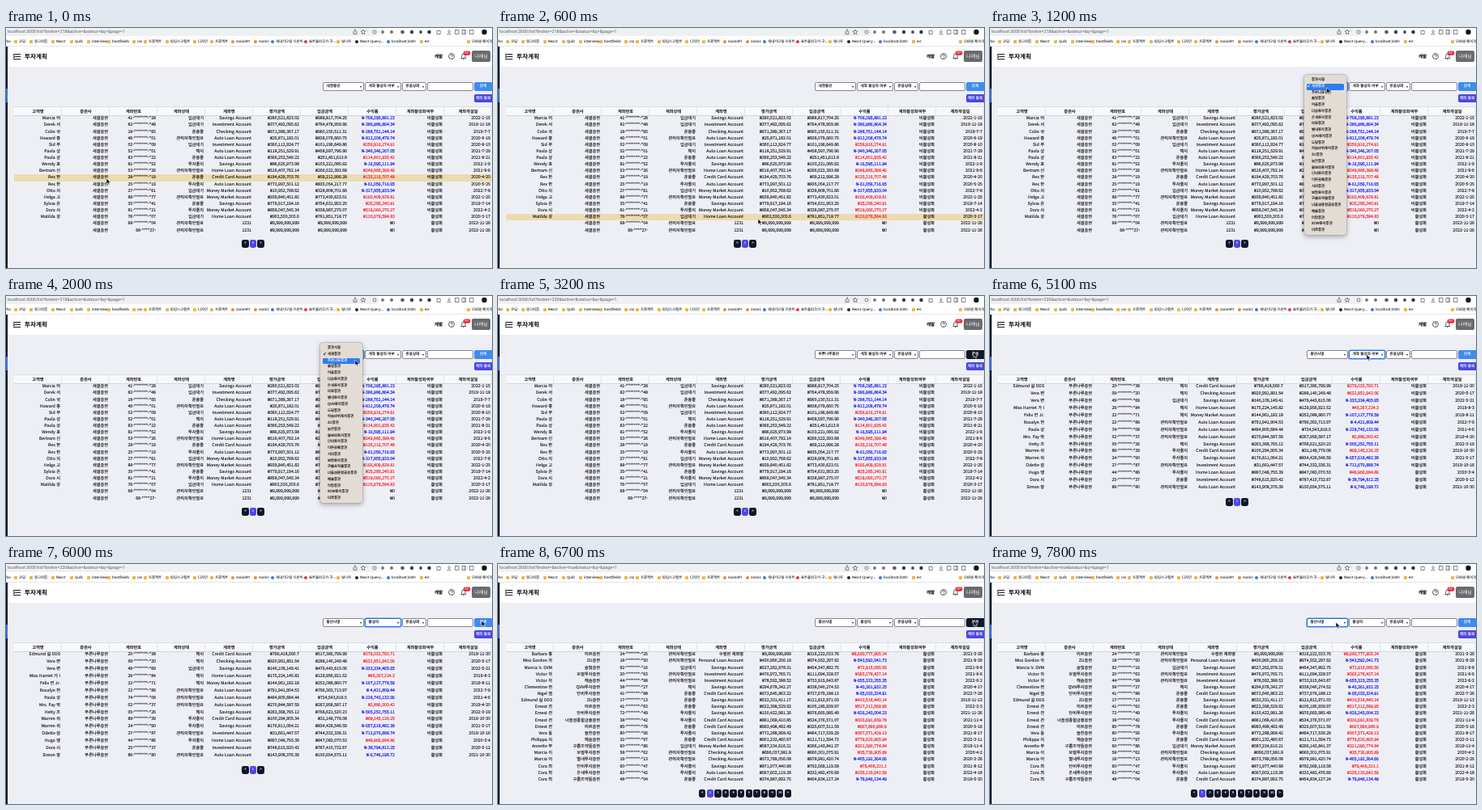
Animation, 600 px wide and 297 px high, one loop 8 s. Source, as an HTML page:

```html
<!DOCTYPE html>
<html lang="ko">
<head>
<meta charset="utf-8">
<title>투자계획</title>
<style>
html, body { margin: 0; width: 100%; height: 100%; overflow: hidden; }
body {
  position: relative; background: #eeeff5; color: #0c0d10;
  font: 5.2px/8px 'Noto Sans CJK KR', 'Noto Sans CJK JP', 'Noto Sans', sans-serif;
  -webkit-text-stroke: .12px currentColor;
  text-rendering: geometricPrecision; white-space: nowrap;
}
#stage { position: absolute; left: 0; top: 0; width: 600px; height: 297px; overflow: hidden; }
#stage > *, .abs { position: absolute; box-sizing: border-box; }
[hidden] { display: none !important; }
.chrome { left: 0; top: 0; width: 600px; height: 23px; background: #fff; border-bottom: 1px solid #e4e5e8; }
.pill { left: -6px; top: 0; width: 467px; height: 10px; border-radius: 0 5px 5px 0; background: #eff0f2; }
#url { left: 2px; top: 1px; font: 5.3px/8px Roboto, sans-serif; color: #5a5d63; -webkit-text-stroke: 0; }
.mark { top: 13px; font-size: 4.4px; color: #26292e; -webkit-text-stroke-width: .08px; }
.mark::before {
  content: ''; position: absolute; left: -6.5px; top: 2px; width: 4.6px; height: 4px;
  border-radius: 1px; background: var(--c);
}
.mark.dot::before { border-radius: 50%; width: 4px; }
.head { left: 0; top: 23px; width: 600px; height: 25px; background: #fff; }
.title { left: 23px; top: 30px; font: bold 7.6px/11px 'Noto Sans CJK KR', sans-serif; -webkit-text-stroke: 0; }
.user { left: 575px; top: 28px; width: 23px; height: 14px; border-radius: 2px; background: #6a6b6f;
  font-size: 6px; line-height: 14px; text-align: center; color: #fff; -webkit-text-stroke: 0; }
.side { left: 0; top: 23px; width: 2px; height: 274px; background: #10172a; }
.side i { left: 0; top: 52px; width: 2px; height: 17px; background: #3b6ee8; }
.sel, .box { top: 67px; height: 11px; background: #fff; border: 1px solid #85878e; border-radius: 2px;
  font-size: 4.6px; line-height: 9.4px; padding-left: 3.5px; }
.sel::after { content: ''; position: absolute; right: 2px; top: 3.5px; border: 1.5px solid transparent;
  border-top: 2.4px solid #17181b; border-bottom: 0; }
.sel.focus { border-color: #2b6fe0; box-shadow: 0 0 0 .6px #4d8df0; }
.btn { left: 578px; width: 22px; height: 10px; border-radius: 2px 0 0 2px; color: #fff;
  font-size: 4.7px; line-height: 10px; text-align: center; }
#search { top: 67px; height: 11px; line-height: 11px; background: #3f8cf0; }
#search.dark { background: #0f172a; }
.add { top: 82px; background: #4b46e0; }
.row { position: absolute; left: 10px; width: 590px; display: grid; grid-template-columns: repeat(10, 59px);
  text-align: right; }
.row span { padding-right: 2px; }
.row.on { background: #ebdcb0; }
.heads { top: 97px; height: 12px; line-height: 11px; font-weight: bold; text-align: center; background: #f7f8fb;
  border-top: 1px solid #dcdde3; border-bottom: 1px solid #d3d5dc; -webkit-text-stroke: 0; }
.heads span { padding: 0; box-shadow: inset -.6px 0 #d5d7de; }
.up, .down { -webkit-text-stroke-width: .18px; }
.up { color: #f5222d; } .down { color: #1616f0; }
.page { width: 8.6px; height: 9.6px; border-radius: 2.4px; background: #0f172a; color: #fff;
  font-size: 4px; line-height: 9.6px; text-align: center; }
.page.now { background: #4f46e5; }
.menu { border-radius: 3px; background: #e3dcd5; box-shadow: 0 0 0 .5px #aaa49e, 0 2px 6px #0005; font-size: 4.4px; }
.menu div { position: absolute; left: 3px; right: 3px; height: 7.75px; line-height: 7.75px; padding-left: 6px;
  border-radius: 1.6px; }
.menu .hot { background: #2e7cf3; color: #fff; }
.menu .tick::before { content: '✓'; position: absolute; left: 1px; font-weight: bold; }
#cursor { left: 0; top: 0; }
</style>
</head>
<body>
<div id="stage">
  <div class="chrome"></div>
  <div class="pill"></div>
  <div id="url"></div>
  <div class="head"></div>
  <div class="side"><i class="abs"></i></div>
  <svg width="600" height="48" fill="none" stroke="#4b4e54" stroke-width=".7">
    <path d="M429 4v3.500h4V4M431 5.500V1.800M429.700 3L431 1.800l1.300 1.200"/>
    <path d="M441 2l.9 1.900 2 .2-1.500 1.400.4 2-1.800-1-1.800 1 .4-2-1.500-1.400 2-.2z"/>
    <circle cx="455" cy="5" r="2"/>
    <g stroke="none">
      <circle cx="465" cy="5" r="2" fill="#777b82"/><circle cx="476" cy="5" r="2" fill="#8a6a66"/>
      <circle cx="489.500" cy="5" r="2.300" fill="#555a63"/><circle cx="501" cy="5" r="2.200" fill="#3a3d43"/>
      <circle cx="512" cy="5" r="1.900" fill="#3b4a66"/><circle cx="522.500" cy="5" r="2.200" fill="#30343b"/>
      <circle cx="590.500" cy="5" r="3.200" fill="#16181c"/>
    </g>
    <path d="M532 3.500h1.300a.8.800 0 0 1 1.600 0h1.300v4H532z"/>
    <path d="M547 2v4M545.300 4.500L547 6l1.700-1.500M544.500 7.500h5M554.500 2.500h4.500v5h-4.500zM563 2.500h4.500v5H563zM565.800 2.500v5M572.500 2.500h4.500v5h-4.500z"/>
    <path d="M9 32.500h9M12 35.500h6M9 38.500h9M9 34l2 1.500-2 1.500" stroke="#15171c" stroke-width="1.100"/>
    <circle cx="550" cy="35" r="3.500" stroke="#15171c"/>
    <path d="M548.900 34.300a1.200 1.200 0 1 1 1.600 1.100l-.5.700M550 37v.6M561.800 37.500h6l-.9-1.200v-2a2.100 2.100 0 0 0-4.200 0v2zM564 38.700h1.600" stroke="#15171c"/>
    <rect x="564.500" y="28.500" width="9" height="5.200" rx="2.600" fill="#e5283b" stroke="none"/>
    <text x="569" y="32.400" font-size="3.600" fill="#fff" stroke="none" text-anchor="middle">99+</text>
  </svg>
  <div class="title">투자계획</div>
  <div style="left:529px;top:31px;font-size:5.5px;font-weight:bold">개발</div>
  <div class="user">나래님</div>
  <div class="sel" id="broker" style="left:391px;width:51px"></div>
  <div class="sel" id="active" style="left:443px;width:45px"></div>
  <div class="sel" style="left:489px;width:30px">운용상태</div>
  <div class="box" style="left:520px;width:57px"></div>
  <div class="btn" id="search">검색</div>
  <div class="btn add">계좌 등록</div>
</div>
<script>
const stage = document.getElementById('stage');
const $ = id => document.getElementById(id);
const LOOP = 8000, STEP = 7.75, ROW_Y = 112.3;

function add(parent, cls, text = '', style = {}) {
  const el = document.createElement('div');
  el.className = cls;
  el.textContent = text;
  for (const k in style) el.style[k] = typeof style[k] === 'number' ? style[k] + 'px' : style[k];
  return parent.appendChild(el);
}

const folder = '#f0b63c', orange = '#f08a24', red = '#e33d3d', blue = '#3d78e8';
[['who', -3, folder], ['코딩', 16, folder], ['알고리즘', 35, folder], ['React', 62, folder], ['Quib', 85, folder],
 ['interview', 106, folder], ['bootfields', 131, folder], ['css', 162, folder], ['프로젝트', 176, folder],
 ['타입스크립트', 203, folder], ['디자인', 237, folder], ['프로젝트', 258, folder], ['mainAPI', 284, orange, 1],
 ['main1', 312, orange, 1], ['새내기모임 프론트..', 333, blue, 1], ['포트폴리오가 구...', 374, red, 1],
 ['일나루', 414, folder], ['React-Query...', 437, '#25282e', 1], ['localhost:3000', 476, blue, 1],
 ['err', 517, folder], ['모바일 페이지', 575, folder]
].forEach(([text, left, color, dot]) => {
  add(stage, dot ? 'mark dot' : 'mark', text, { left }).style.setProperty('--c', color);
});

const brokers = ['증권사명', '새결증권', '푸른나루증권', '솔빛증권', '여울증권', '다솜투자증권', '온새투자증권',
  '마루증권', '별내투자증권', 'QVN투자증권', '도담증권', '하늘바위투자증권', 'ZU증권', '늘찬증권', '물보라투자증권',
  '단비투자증권', '이든골목증권', '서리증권', '보람투자증권', '구름조약돌증권', '너울섬종합금융증권', '해솔증권',
  '아람증권', 'XOW투자증권', '미르증권'];
const actives = ['계좌 활성화 여부', '활성화', '비활성화'];
const status = { W: '입금대기', R: '운용중', N: '관리자확인필요', C: '해지', S: '투자중지' };
const kinds = { sav: 'Savings', inv: 'Investment', chk: 'Checking', auto: 'Auto Loan', home: 'Home Loan',
  card: 'Credit Card', mm: 'Money Market', own: 'Personal Loan' };

// name | account | status | kind | value | deposit | profit | date | broker
const first = `Marcia 어|41 28|W|sav|280,521,823.02|988,817,704.25|-708,295,881.23|2022-1-15
Derek 서|82 48|W|inv|377,492,095.62|764,478,959.96|-386,986,864.34|2019-11-18
Colin 국|18 65|R|chk|671,389,367.17|960,150,511.31|-288,761,144.14|2019-7-7
Howard 홍|46 01|N|auto|25,871,182.01|838,079,660.75|-812,208,478.74|2020-6-19
Sid 부|02 09|W|inv|360,112,924.77|101,196,649.86|258,916,274.91|2020-8-10
Paula 상|52 01|C|auto|118,251,529.91|458,597,796.96|-340,346,267.05|2021-7-29
Paula 상|83 22|R|auto|366,253,549.22|251,451,613.8|114,801,935.42|2021-8-21
Wendy 호|81 52|S|sav|86,625,973.98|103,221,085.92|-16,595,111.94|2022-1-9
Bertram 신|53 26|N|home|516,407,792.14|266,522,393.68|249,885,398.46|2021-9-6
Rex 한|28 19|R|card|194,429,703.76|59,212,996.28|135,216,707.48|2020-4-20
Rex 한|25 19|S|auto|773,997,501.12|835,054,217.77|-61,056,716.65|2020-5-25
Otto 지|27 61|W|mm|10,952,768.62|328,808,701.66|-317,855,933.04|2022-7-8
Helga 고|88 77|N|mm|939,840,451.82|773,430,623.01|166,409,828.81|2022-1-25
Sylvia 은|35 41|R|sav|779,917,194.16|754,631,953.25|25,285,240.91|2019-7-14
Dora 시|81 21|S|mm|858,047,545.34|338,987,275.07|519,060,270.27|2022-4-2
Matilda 강|76 07|W|home|902,530,303.6|781,851,718.77|120,678,584.83|2020-3-17
|68 04|N|1231|9,999,999,999|9,999,999,999|0|2022-11-26
|68-****27-|N|1231|9,999,999,999|9,999,999,999|0|2022-11-26`;

const second = `Edmund 길 DDS|20 38|C|card|796,418,560.7|517,385,799.99|279,032,760.71|2019-11-30
Vera 변|09 20|C|chk|920,991,891.54|288,140,249.48|632,851,642.06|2020-5-17
Vera 변|49 69|W|sav|146,109,149.41|479,443,615.06|-333,334,465.65|2022-5-21
Miss Harriet 가 I|26 84|C|home|175,224,145.82|129,956,921.52|45,267,224.3|2019-8-3
Felix 연 Jr.|22 71|C|mm|144,961,182.18|252,088,960.77|-107,127,778.59|2019-8-11
Rosalyn 천|22 89|N|auto|791,941,904.53|796,363,713.97|-4,421,809.44|2022-7-9
Paula 상|74 08|N|auto|494,800,684.44|724,543,816.5|-229,743,132.06|2021-4-6
Mrs. Fay 박|02 37|N|auto|270,844,587.59|267,958,587.17|2,886,000.42|2019-4-20
Hetty 조|05 26|C|sav|263,368,765.12|768,621,520.23|-505,252,755.11|2022-3-19
Warren 위|89 39|S|card|100,294,905.34|31,149,779.08|69,145,126.25|2019-10-30
Warren 위|24 90|S|sav|176,811,064.21|834,429,546.59|-657,618,482.38|2021-5-17
Odette 감|27 87|N|inv|31,661,447.57|744,332,336.31|-712,670,888.74|2019-10-16
Hugo 맹|44 86|S|home|897,049,755.39|847,083,070.53|49,966,684.86|2020-3-4
Dora 시|25 37|R|inv|748,615,920.42|787,410,732.67|-38,794,812.25|2020-5-12
Simon 장|86 80|N|auto|143,908,376.39|150,654,575.11|-6,746,198.72|2021-10-30`;

const third = `Barbara 홍|24 25|N|수정된 계좌명|9,999,999,999|316,222,033.76|9,683,777,965.24|2021-3-26|24
Miss Gordon 하|18 50|N|own|430,960,256.19|974,552,297.92|-543,592,041.73|2021-9-29|12
Marcia 노 DVM|92 16|W|sav|527,262,978.31|454,347,892.75|72,915,085.56|2021-9-8|3
Victor 하|20 63|N|inv|476,972,765.71|111,694,328.57|365,278,437.14|2021-6-6|18
Victor 하|44 98|N|inv|78,592,388.52|733,915,643.87|-655,323,255.35|2022-6-2|21
Clementine 전|58 27|C|sav|294,678,342.27|338,040,274.52|-43,361,932.25|2020-4-17|9
Nigel 염|41 88|R|card|672,645,863.22|737,679,188.13|-65,033,324.91|2022-7-26|15
Edmund 길 DDS|17 13|R|sav|532,331,411.17|121,812,971.03|410,518,440.14|2019-11-13|12
Ernest 견|41 63|R|sav|622,398,529.92|105,185,939.97|517,212,589.95|2022-2-3|24
Ernest 견|72 49|S|sav|150,422,981.26|976,665,985.49|-826,243,004.23|2021-11-26|15
Ernest 견|38 42|S|card|861,068,410.85|534,376,571.07|326,691,839.78|2021-11-4|20
Ernest 견|85 78|R|card|993,498,492.49|325,607,511.59|667,890,980.9|2020-5-16|24
Vera 동|80 56|S|sav|772,288,968.42|464,717,539.29|307,571,429.13|2021-8-17|13
Philippa 지|32 97|R|card|901,232,460.67|121,711,594.73|779,520,865.94|2022-3-11|21
Annette 부|60 86|W|mm|587,234,616.21|266,143,841.37|321,090,774.84|2019-11-4|19
Marcia 이|58 62|N|chk|696,037,981.8|660,301,075.91|35,736,905.89|2020-4-2|18
Marcia 어|16 13|N|chk|573,789,056.08|978,981,420.74|-405,192,364.66|2020-2-26|8
Cora 최|60 47|S|sav|871,977,440.68|792,569,119.58|79,408,321.1|2021-8-12|15
Cora 최|83 42|S|auto|567,602,119.28|332,482,476.69|235,120,642.59|2022-4-18|6
Cora 최|48 04|R|card|374,887,992.75|454,834,127.24|-79,946,134.49|2019-5-20|19`;

function addRow(parent, cls, cells, style) {
  const row = add(parent, cls, '', style);
  cells.forEach(c => row.appendChild(document.createElement('span')).textContent = c);
  return row;
}

addRow(stage, 'row heads', ['고객명', '증권사', '계좌번호', '계좌상태', '계좌명', '평가금액', '입금금액', '수익률',
  '계좌활성화여부', '계좌개설일']);

// The last `open` rows are active accounts.
function makeTable(text, broker, open, pitch, pages, pageY) {
  const el = add(stage, 'table', '', { left: 0, top: 0 });
  const lines = text.split('\n');
  const rows = lines.map((line, i) => {
    const [name, no, st, kind, value, paid, gain, date, b = broker] = line.split('|');
    const account = no.includes('*') ? no : no.replace(' ', '-*******-*');
    const row = addRow(el, 'row', [name, brokers[b], account, status[st],
      kinds[kind] ? kinds[kind] + ' Account' : kind, '₩' + value, '₩' + paid, '₩' + gain,
      actives[i >= lines.length - open ? 1 : 2], date],
      { top: ROW_Y + pitch * i - pitch / 2, height: pitch, lineHeight: pitch + 'px' });
    if (gain !== '0') row.children[7].className = gain[0] === '-' ? 'down' : 'up';
    return row;
  });
  for (let i = 0; i < pages + 2; i++) {
    const label = i === 0 ? '<' : i > pages ? '>' : i;
    add(el, i === 1 ? 'abs page now' : 'abs page', label,
      { left: 305 - 4.3 + (i - (pages + 1) / 2) * 9.6, top: pageY - 4.8 });
  }
  return { el, rows, pitch };
}

const tables = [
  makeTable(first, 1, 3, 8.14, 1, 267),
  makeTable(second, 2, 3, 8.96, 1, 255),
  makeTable(third, 0, 20, 8.14, 10, 284)
];

function makeMenu(left, width, labels) {
  const el = add(stage, 'menu', '', { left, width, height: labels.length * STEP + 4 });
  const items = labels.map((text, i) => add(el, '', text, { top: 2.8 + i * STEP }));
  return { el, items };
}
const menus = [makeMenu(388, 52, brokers), makeMenu(440, 46, actives)];

stage.insertAdjacentHTML('beforeend', `<svg id="cursor" width="8" height="11" viewBox="-1 -1 8 11">
  <path d="M0 0V7L1.600 5.600 2.700 8.200 3.900 7.700 2.800 5.200H5Z" fill="#000" stroke="#fff" stroke-width=".6"/></svg>`);

// time, x, y of the pointer tip
const path = [[0, 124, 186], [300, 215, 273], [600, 321, 236], [900, 415, 74], [1150, 415, 73], [1550, 428, 92],
  [1950, 431, 79], [2450, 431, 79], [3000, 587, 69], [3500, 587, 69], [3900, 424, 72], [4050, 424, 71],
  [4280, 420, 62], [4400, 420, 62], [4600, 418, 57], [4800, 418, 57], [5050, 465, 72], [5200, 465, 73],
  [5400, 461, 80], [5550, 461, 80], [6000, 587, 70], [6900, 587, 70], [7600, 427, 72], [8000, 427, 72]];

function pointer(t) {
  const i = Math.max(1, path.findIndex(p => p[0] >= t));
  const [a, b] = [path[i - 1], path[i]];
  const u = Math.max(0, (t - a[0]) / (b[0] - a[0]));
  const e = u * u * (3 - 2 * u);
  return [a[1] + (b[1] - a[1]) * e, a[2] + (b[2] - a[2]) * e];
}

const between = (t, ...spans) => spans.some(([a, b]) => t >= a && t < b);

function drawMenu(menu, open, chosen, y) {
  menu.el.hidden = !open;
  menu.el.style.top = 72 - (chosen + .5) * STEP - 2 + 'px';
  const hot = Math.round(chosen + (y - 72) / STEP);
  menu.items.forEach((item, i) => item.className = (i === hot ? 'hot ' : '') + (i === chosen ? 'tick' : ''));
}

function draw(t) {
  const [x, y] = pointer(t);
  const broker = t < 2350 ? 1 : t < 4750 ? 2 : 0;
  const active = t < 5520 ? 0 : 1;
  const brokerOpen = between(t, [1100, 2350], [3980, 4750]);
  const activeOpen = between(t, [5120, 5520]);

  const query = t < 3120 ? 'broker=218&active=' : t < 6500 ? 'broker=230&active=' : 'broker=&active=true';
  $('url').textContent = `localhost:3000/list?${query}&status=&q=&page=1`;
  $('broker').textContent = brokers[broker];
  $('active').textContent = actives[active];
  $('broker').classList.toggle('focus', between(t, [1050, 3100], [3950, 5080], [7650, LOOP]));
  $('active').classList.toggle('focus', between(t, [5080, 6500]));
  $('search').classList.toggle('dark', pointer(Math.max(0, t - 100))[0] > 578);

  const shown = t < 3350 ? 0 : t < 6700 ? 1 : 2;
  tables.forEach((table, n) => {
    table.el.hidden = n !== shown;
    const hover = brokerOpen || activeOpen ? -1 : Math.round((y - ROW_Y) / table.pitch);
    table.rows.forEach((row, i) => row.classList.toggle('on', i === hover));
  });
  drawMenu(menus[0], brokerOpen, broker, y);
  drawMenu(menus[1], activeOpen, active, y);
  $('cursor').style.transform = `translate(${x - 1}px, ${y - 1}px)`;
}

const start = performance.now();
function tick() {
  draw((performance.now() - start) % LOOP);
  requestAnimationFrame(tick);
}
tick();
</script>
</body>
</html>
```
